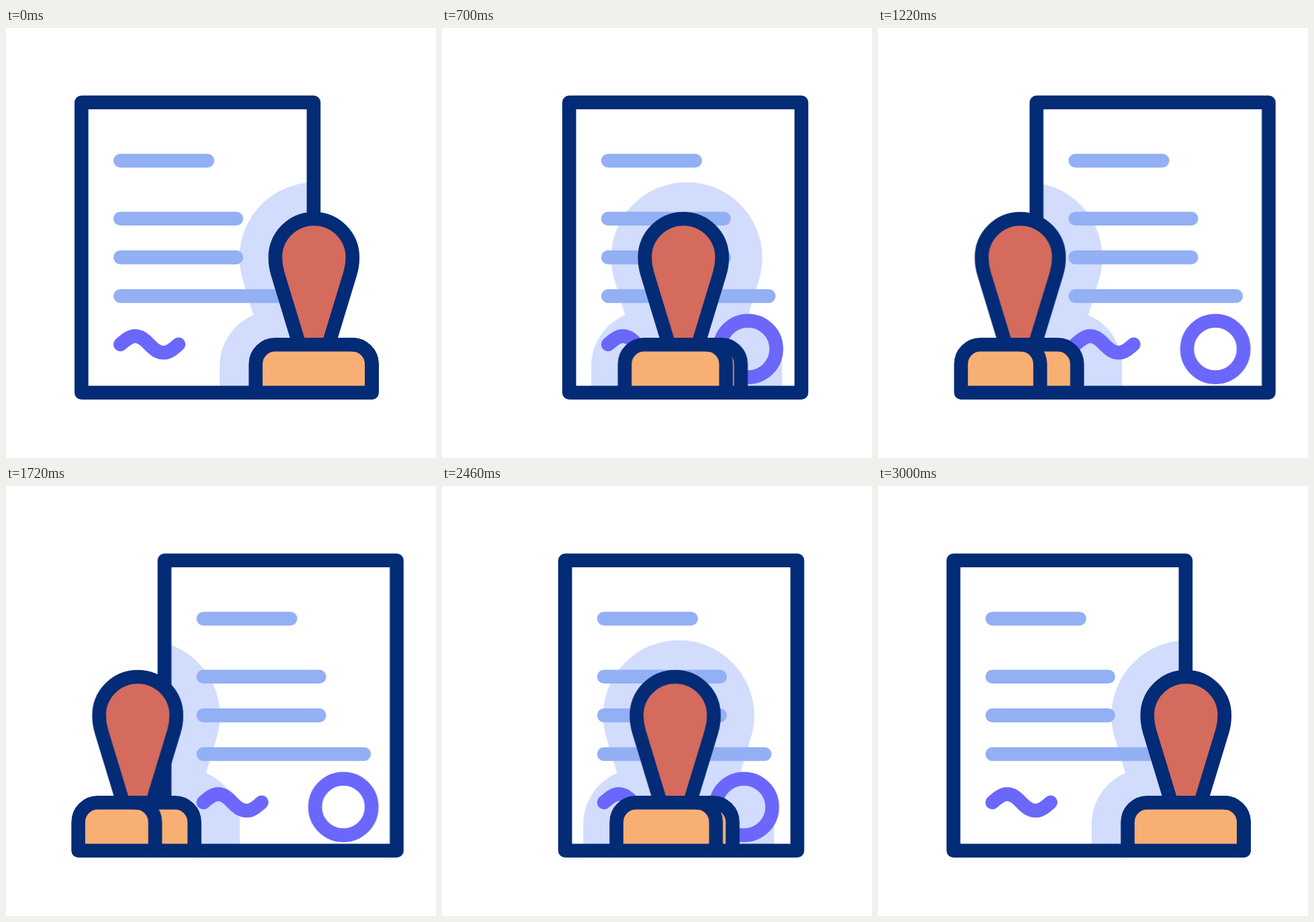
Recreate the animation shown at these times as an HTML page without scripts. Size 640 by 640 pixels, loop 3.22 s.

```html
<!DOCTYPE html>
<html lang="en">
<head>
<meta charset="utf-8">
<title>Stamping a document</title>
<style>
  html, body { margin: 0; width: 100%; height: 100%; overflow: hidden; background: #fff; }
  svg { display: block; width: 100%; height: 100%; }

  .outline, .lines, .sign, .seal {
    fill: none; stroke-width: 20.6; stroke-linecap: round; stroke-linejoin: round;
  }
  .outline { stroke: #032b76; }
  .lines { stroke: #92b0f3; }
  .sign, .seal { stroke: #6a67fa; }
  .shade { fill: #d2dcfd; }
  .grip { fill: #d46b5d; }
  .block { fill: #f7af74; }

  /* Stamp layers share one timing; each travels its own distance. */
  .slide { animation: slide 3220ms infinite; }
  .shade { --far: -254px; }
  .grip { --far: -262.3px; }
  .block { --far: -264px; }
  .edge { --far: -322.5px; }
  @keyframes slide {
    0%, 6.211% { transform: translateX(0); animation-timing-function: cubic-bezier(.3333, 0, .6667, 1); }
    43.478% { transform: translateX(var(--far)); animation-timing-function: linear; }
    55.901% { transform: translateX(var(--far)); animation-timing-function: cubic-bezier(.3333, 0, .6667, 1); }
    93.168%, 100% { transform: translateX(0); }
  }

  .page { animation: page 3220ms infinite; }
  @keyframes page {
    0%, 6.211% { transform: translateX(0); animation-timing-function: cubic-bezier(.3333, 0, .6667, 1); }
    32.919% { transform: translateX(123.6px); animation-timing-function: linear; }
    65.528% { transform: translateX(123.6px); animation-timing-function: cubic-bezier(.18, 0, .685, 1); }
    93.168%, 100% { transform: translateX(0); }
  }

  /* The seal appears and vanishes while the stamp covers it. */
  .seal { animation: seal 3220ms step-end infinite; }
  @keyframes seal {
    0%, 83.23%, 100% { opacity: 0; }
    15.528% { opacity: 1; }
  }
</style>
</head>
<body>
<svg viewBox="0 0 640 640">
  <g class="shade slide">
    <path d="M347.5 342A112.5 112.5 0 0 1 572.5 342C572.5 353 570.7 364 567.7 374L535 483H385L352.3 374C349.3 364 347.5 353 347.5 342Z"/>
    <path d="M318 540V503A82 82 0 0 1 400 421H520A82 82 0 0 1 602 503V540Z"/>
  </g>

  <g class="page">
    <!-- hides the shade outside the page -->
    <path fill="#fff" d="M-500 0H112V640H-500ZM458 0H1100V640H458Z"/>
    <path class="lines" d="M170.2 197.5H299.7M170.2 283.8H342.7M170.2 341.4H342.7M170.2 399H409.3"/>
    <path class="sign" d="M170.2 470.9C177 465 184 458.6 192 458.6C210 458.6 216 483.3 235 483.3C243 483.3 250 477 256.8 470.9"/>
    <circle class="seal" cx="378.5" cy="477.8" r="42.1"/>
    <rect class="outline" x="112.3" y="110.8" width="345.6" height="432"/>
  </g>

  <g class="grip slide">
    <path class="outline" style="fill:inherit" d="M436.5 471.3L404.5 366C402 358 400.8 350 400.8 341.5A57.5 57.5 0 0 1 515.8 341.5C515.8 350 514.6 358 512.1 366L480.1 471.3Z"/>
  </g>
  <g class="block slide">
    <path class="outline" style="fill:inherit" d="M371.6 542.8V500.3A29 29 0 0 1 400.6 471.3H515.5A29 29 0 0 1 544.5 500.3V542.8Z"/>
  </g>
  <g class="edge slide">
    <path class="outline" d="M515.5 471.3A29 29 0 0 1 544.5 500.3V542.8"/>
  </g>
</svg>
</body>
</html>
```
